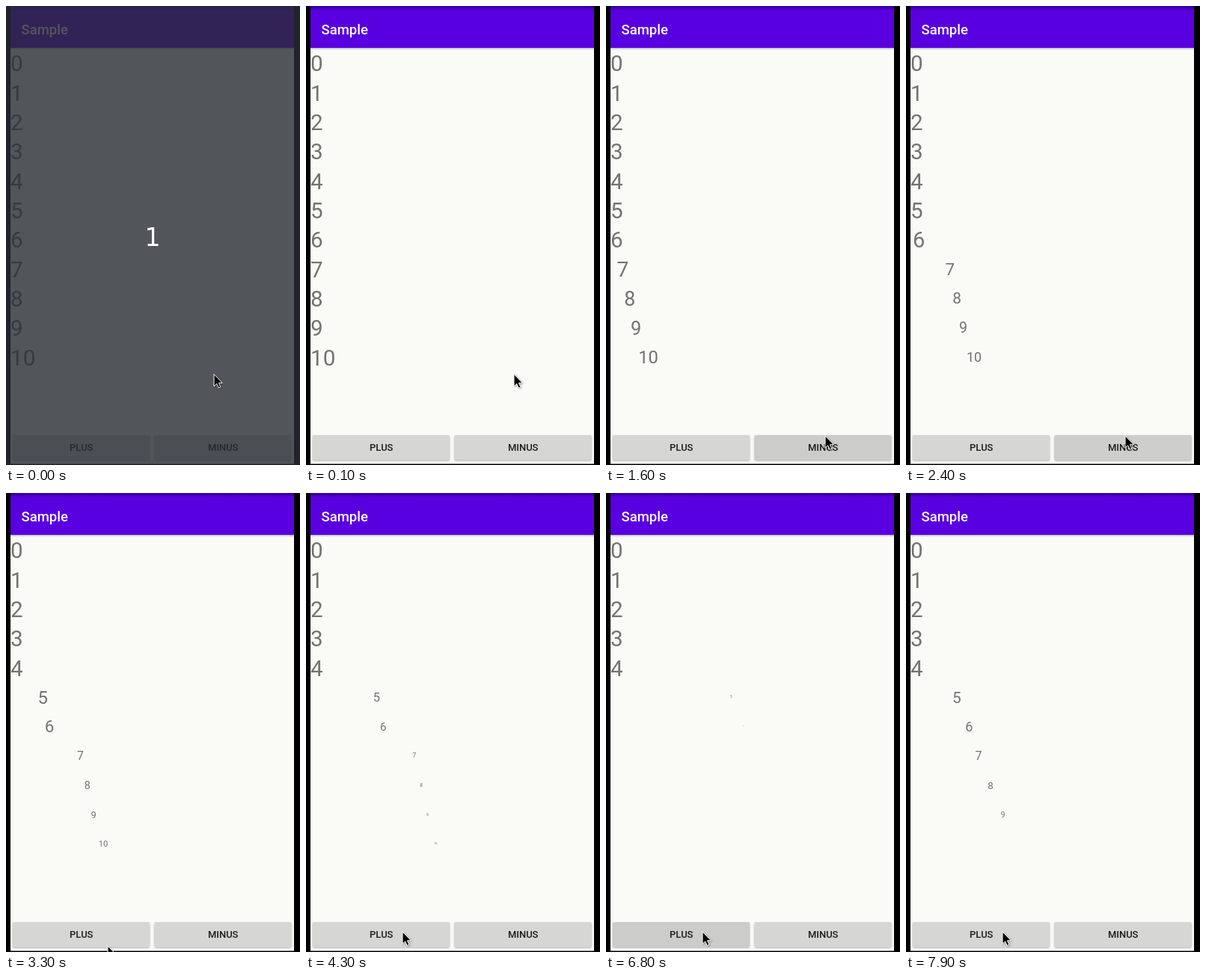
An HTML page for the animation above (8000 ms loop, 393 by 614 pixels).

```html
<!DOCTYPE html>
<html lang="en">
<head>
<meta charset="utf-8">
<title>Sample list</title>
<style>
  html, body { margin: 0; width: 100%; height: 100%; overflow: hidden; background: #000; }
  svg { display: block; width: 393px; height: 614px; font-family: Roboto, sans-serif; }
  .digit { font-size: 29.6px; fill: #737372; }
  .label { font-size: 12.95px; font-weight: 500; fill: #1b1b1b; text-anchor: middle; }
  .button { fill: #d6d7d4; filter: drop-shadow(0 1px 1px rgba(0, 0, 0, .3)); }
  .press { fill: #000; }
</style>
</head>
<body>
<svg viewBox="0 0 393 614">
  <defs>
    <linearGradient id="status" x2="0" y2="1">
      <stop offset="0" stop-color="#3500a4"/>
      <stop offset=".5" stop-color="#4000b4"/>
      <stop offset="1" stop-color="#5900e1"/>
    </linearGradient>
    <linearGradient id="shade" x2="0" y2="1">
      <stop offset="0" stop-opacity=".25"/>
      <stop offset="1" stop-opacity="0"/>
    </linearGradient>
  </defs>
  <rect width="393" height="614"/>
  <rect x="6" width="379" height="612.5" fill="#fafaf6"/>
  <rect x="6" y="56" width="379" height="3" fill="url(#shade)"/>
  <rect x="6" width="379" height="56" fill="#5900e1"/>
  <rect x="6" width="379" height="6" fill="url(#status)"/>
  <text x="20.5" y="38" font-size="18.5" font-weight="500" fill="#fff">Sample</text>
  <g id="rows"></g>
  <g id="buttons"></g>
  <g id="dim">
    <rect width="393" height="614" fill="rgb(40,44,52)" fill-opacity=".8"/>
    <text x="196" y="321" font-size="33" fill="#fff" text-anchor="middle"
          style="font-family:'DejaVu Sans',sans-serif">1</text>
  </g>
  <path id="cursor" d="M0 0V16.2L3.7 12.8L6.3 18.4L8.9 17.2L6.4 11.7H11.4Z"
        stroke="#fff" stroke-width="1" style="filter:drop-shadow(1px 1px 1px rgba(0,0,0,.35))"/>
</svg>
<script>
  const LOOP = 8000, STEP = 100;
  const EXIT = 4000, ENTER = 2000;
  const ROW_HEIGHT = 39.33, LIST_TOP = 56, CENTER_X = 195.5;

  // Click times, keyed by the row they remove or add.
  const removedAt = { 10: 815, 9: 1030, 8: 1215, 7: 1420, 6: 2335, 5: 2530 };
  const addedAt = { 5: 6490, 6: 6672, 7: 6812, 8: 6990, 9: 7172 };

  const cursorPath = [
    [200, 278, 492.5], [500, 293, 575], [2600, 293, 575],
    [3000, 218, 597], [3300, 136, 606], [3400, 133, 605], [3600, 129, 587]
  ];

  const $ = id => document.getElementById(id);
  const clamp = v => Math.min(1, Math.max(0, v));

  function add(parent, tag, attrs, text = '') {
    const node = document.createElementNS('http://www.w3.org/2000/svg', tag);
    for (const key in attrs) node.setAttribute(key, attrs[key]);
    node.textContent = text;
    return parent.appendChild(node);
  }

  const rows = Array.from({ length: 11 }, (_, i) =>
    add($('rows'), 'text', { class: 'digit', x: 6, y: LIST_TOP + i * ROW_HEIGHT + 31.3 }, i));

  function addButton(x, label) {
    const box = { x, y: 574, width: 183, height: 33.5, rx: 2 };
    add($('buttons'), 'rect', { class: 'button', ...box });
    const press = add($('buttons'), 'rect', { class: 'press', ...box });
    add($('buttons'), 'text', { class: 'label', x: x + 91.7, y: 595 }, label);
    return press;
  }
  const plus = addButton(9, 'PLUS');
  const minus = addButton(198.5, 'MINUS');

  function rowScale(i, t) {
    const leaving = i in removedAt ? clamp(1 - (t - removedAt[i]) / EXIT) : 1;
    const entering = i in addedAt ? clamp((t - addedAt[i]) / ENTER) : 0;
    return Math.max(leaving, entering);
  }

  const held = (t, from, to) => clamp((t - from) / 150) * clamp(1 - (t - to) / 300);

  function cursorAt(t) {
    const next = cursorPath.findIndex(p => p[0] > t);
    if (next < 0) return cursorPath.at(-1).slice(1);
    if (next === 0) return cursorPath[0].slice(1);
    const a = cursorPath[next - 1], b = cursorPath[next];
    const k = (t - a[0]) / (b[0] - a[0]);
    return [1, 2].map(n => a[n] + (b[n] - a[n]) * k);
  }

  function draw(t) {
    rows.forEach((row, i) => {
      const s = rowScale(i, t), y = LIST_TOP + (i + .5) * ROW_HEIGHT;
      row.setAttribute('visibility', s > .03 ? 'visible' : 'hidden');
      row.setAttribute('transform',
        `translate(${CENTER_X} ${y}) scale(${s}) translate(${-CENTER_X} ${-y})`);
    });
    minus.setAttribute('opacity', .047 * (held(t, 750, 1600) + held(t, 2270, 2620)));
    plus.setAttribute('opacity', .047 * held(t, 6400, 6800));
    $('cursor').setAttribute('transform', `translate(${cursorAt(t)})`);
    $('dim').setAttribute('visibility', t < 100 ? 'visible' : 'hidden');
  }

  const start = performance.now();
  function tick() {
    const t = (performance.now() - start) % LOOP;
    draw(Math.floor(t / STEP) * STEP);
    requestAnimationFrame(tick);
  }
  tick();
</script>
</body>
</html>
```
